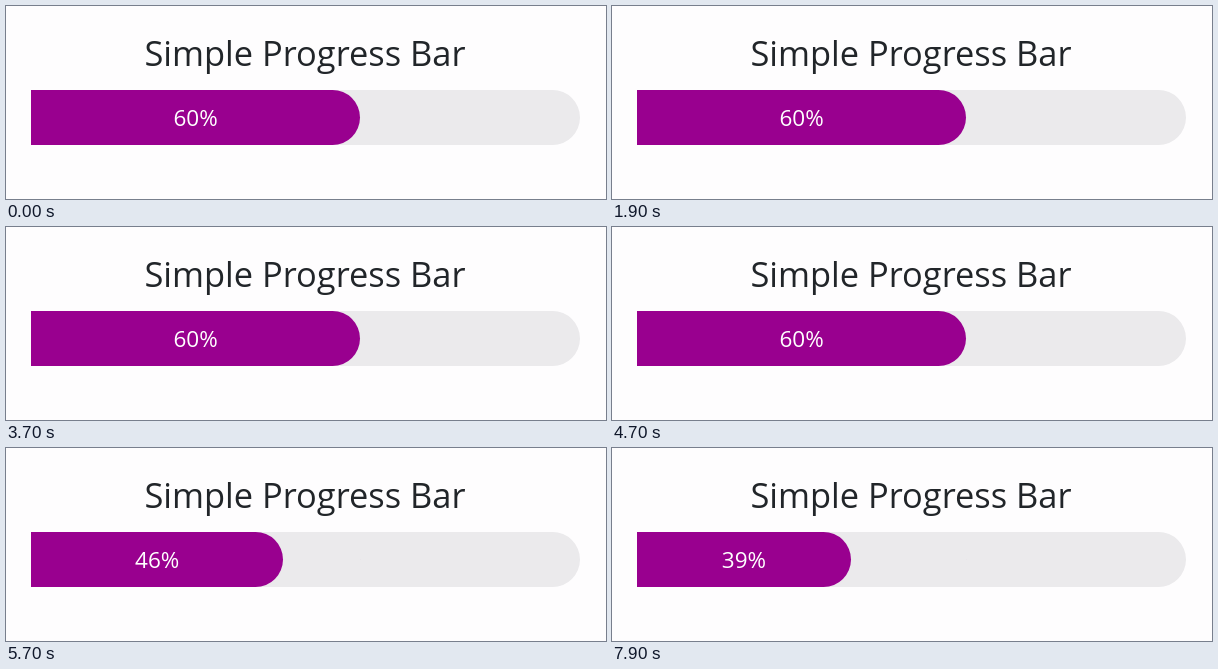
Animation of 600x193 px, one loop 8000 ms. Source, as an HTML page:

```html
<!DOCTYPE html>
<html lang="en">
<head>
<meta charset="utf-8">
<title>Simple Progress Bar</title>
<style>
  html, body {
    margin: 0;
    width: 100%;
    height: 100%;
    overflow: hidden;
    background: #fefdfe;
  }
  body {
    position: relative;
    font-family: "Open Sans", "Noto Sans", sans-serif;
  }
  h1 {
    position: absolute;
    left: 0;
    top: 21.5px;
    width: 598px;
    margin: 0;
    font-size: 34.4px;
    font-weight: 400;
    line-height: 50px;
    text-align: center;
    white-space: nowrap;
    color: #212529;
  }
  .track {
    position: absolute;
    left: 25px;
    top: 84px;
    width: 548.5px;
    height: 55px;
    background: #ebeaec;
  }
  .track, .bar {
    border-radius: 0 50px 50px 0;
  }
  .bar {
    width: 60%;
    height: 100%;
    background: #99008f;
    color: #fff;
    font-size: 22.5px;
    line-height: 55px;
    text-align: center;
    white-space: nowrap;
  }
</style>
</head>
<body>
<h1>Simple Progress Bar</h1>
<div class="track"><div class="bar" id="bar">60%</div></div>
<script>
  const LOOP = 8000;    // ms
  const CYCLE = 2340;   // one fill plus its pause
  const START = 90;     // first reset to zero
  const STEP = 20;      // ms per percent
  const GOAL = 60;
  const bar = document.getElementById("bar");

  function percentAt(time) {
    const elapsed = (time % LOOP - START + CYCLE) % CYCLE;
    return Math.min(GOAL, Math.floor(elapsed / STEP));
  }

  let origin;
  function draw(now) {
    origin ??= now;
    const label = percentAt(now - origin) + "%";
    bar.style.width = label;
    bar.textContent = label;
    requestAnimationFrame(draw);
  }
  requestAnimationFrame(draw);
</script>
</body>
</html>
```
